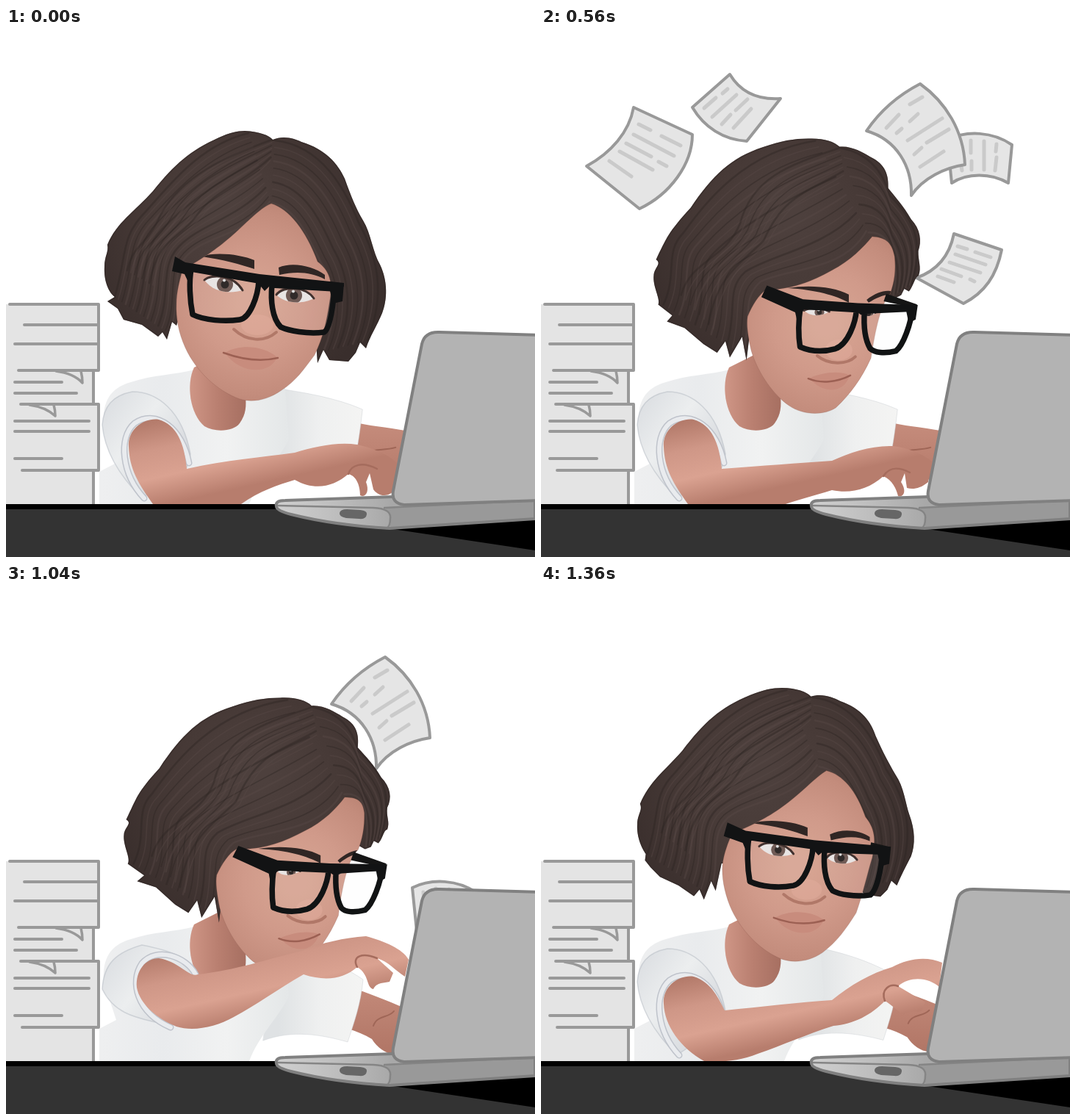
Write an HTML page with a canvas that moves like this. It is 720 px wide and 720 px high and loops after 1.44 s.

```html
<!DOCTYPE html>
<html lang="en">
<head>
<meta charset="utf-8">
<title>Busy at the laptop</title>
<style>
html, body { margin: 0; width: 100%; height: 100%; overflow: hidden; background: #fff; }
canvas { display: block; width: 100vw; height: 100vh; }
</style>
</head>
<body>
<canvas id="stage" width="720" height="720"></canvas>
<script>
const ctx = document.getElementById('stage').getContext('2d');
const STEP = 80, STEPS = 18;

// Poses per 80 ms step: head turn, near arm lift (0 to 3), far arm drop.
const TURN = [0, -.02, -.04, -.05, .04, .3, .65, .88, .95, .98, 1, 1, .99, .98, .95, .86, .68, .27];
const LIFT = [1, 1, 1, 1, 1, .8, .4, 0, .4, .8, .3, 0, 1.5, 3, 2, .8, .15, 2];
const DROP = [.62, .55, .5, .5, .5, .5, .55, .62, .4, .6, .3, 0, .5, 1, .8, .3, 0, .95];

// Each sheet: outline, text dashes, first visible step, vertical offset per step.
const SHEETS = [
  { edge: 'M126,108 L206,145 C206,185 176,226 134,246 L62,188 C95,170 120,142 126,108Z',
    text: 'M133,131L149,139M164,147L190,160M126,145L181,174M116,157L150,175M160,182L171,188M107,168L152,193M93,181L123,202',
    start: 1, dy: [226, 118, 31, -22, -44, -38, 0, 67, 164, 292] },
  { edge: 'M257,63 C272,88 296,98 326,96 L280,154 C248,152 222,135 206,108Z',
    text: 'M238,95L222,109M254,83L247,89M266,91L233,121M281,97L265,112M258,118L246,131M286,110L262,136',
    start: 4, dy: [147, 47, 2, 0, 1, 7, 27, 54, 102, 177] },
  { edge: 'M562,280 L627,302 C620,337 604,360 575,375 L511,340 C540,330 556,310 562,280Z',
    text: 'M567,297L580,301M591,305L612,312M564,308L605,322M556,319L598,333M545,328L572,338M584,342L590,345M540,338L562,346',
    start: 2, dy: [170, 112, 60, 15, -2, 0, 30, 90, 180], grows: true },
  { edge: 'M553,158 C580,145 615,147 641,165 L636,217 C612,203 580,203 559,217Z',
    text: 'M568,164L569,177M571,187L573,200M585,159V176M586,187V199M603,160V199M620,164L619,174M620,182L618,200',
    start: 4, dy: [270, 150, 55, -6, -36, -43, -30, 0, 90, 254, 420] },
  { edge: 'M516,76 C551,101 575,140 577,186 C550,190 520,204 504,228 C505,188 484,152 443,140 C460,115 485,92 516,76Z',
    text: 'M502,104L519,94M470,136L487,118M502,127L513,117M484,143L491,137M499,153L546,123M525,156L555,138M508,172L518,163M516,189L548,168',
    start: 4, dy: [250, 125, 50, 0, -22, -33, -36, -31, -12, 22, 75, 200] }
];

// Head shapes: [facing forward, turned to the laptop].
const HAIR = [
  'M325,140 C345,141 358,146 363,152 C377,146 392,150 402,155 C435,165 452,185 461,205 C470,230 476,245 486,262 C497,280 499,305 509,322 C520,345 519,370 512,388 C505,405 495,420 490,436 L482,428 L476,442 L466,454 L440,452 L432,438 L424,456 L420,400 L240,380 L232,405 L226,400 L219,424 L213,414 L207,420 L185,404 L160,397 L152,382 L138,372 L148,366 C140,360 133,345 134,325 C134,310 140,305 138,295 C150,265 175,250 200,222 C230,185 250,167 290,149 C303,143 315,140 325,140Z',
  'M375,154 C395,153 410,157 418,165 C435,164 450,174 460,180 C480,190 482,205 480,222 C492,235 502,245 512,262 C525,275 527,290 520,303 C518,315 524,322 520,332 C515,332 514,345 508,350 L502,347 L498,355 L490,358 L480,352 L470,350 L460,345 L450,340 L300,390 L292,461 L286,425 L268,454 L262,430 L250,447 L232,436 L206,412 L180,404 L190,396 L167,380 C172,372 160,355 162,340 C163,330 174,325 165,320 C180,290 178,285 210,250 C240,205 265,180 310,166 C335,157 355,154 375,154Z'];
const FACE = [
  'M361,239 C385,246 408,275 424,318 C440,330 446,345 440,375 C436,400 432,420 420,445 C405,465 395,480 375,493 C355,507 335,510 318,505 C290,495 260,470 244,435 C235,415 231,395 232,375 C232,360 236,345 240,330 C270,312 285,302 305,285 C325,268 345,245 361,239Z',
  'M463,290 C478,290 487,292 489,310 C489,330 486,345 480,360 C466,372 458,410 453,450 C440,480 425,500 405,520 C390,530 360,530 340,515 C320,500 300,470 292,440 C288,420 286,405 288,395 C295,380 305,365 315,360 C350,362 380,351 408,336 C435,323 452,305 463,290Z'];
const EYES = [
  ['M270,343 C280,334 310,336 322,357 C305,362 282,360 270,343Z', 'M370,390 C378,386 392,386 402,390 C392,397 378,398 370,390Z'],
  ['M368,363 C378,350 408,352 419,368 C405,376 380,376 368,363Z', 'M446,392 C450,388 456,388 460,390 C456,396 450,396 446,392Z']];
const IRISES = [['M298,349', 'M390,392'], ['M392,364', 'M453,392']];
const BROWS = [
  ['M266,311 C285,304 320,308 338,316 L338,328 C320,322 295,315 266,311Z', 'M345,360 C375,355 410,358 430,369 L430,380 C412,370 385,362 345,360Z'],
  ['M371,326 C390,318 418,324 434,336 L434,342 C415,332 395,331 372,336Z', 'M453,376 C465,365 478,360 484,362 L484,366 C475,366 465,372 456,379Z']];
const LENSES = [
  ['M252,328 L344,344 C343,365 332,395 318,397 C298,400 270,398 254,390 C250,370 249,345 252,328Z', 'M367,386 L441,389 C440,405 430,435 412,442 C395,447 380,446 366,440 C363,420 365,400 367,386Z'],
  ['M362,350 L447,355 C445,380 441,409 433,414 C410,417 385,412 374,407 C362,395 360,370 362,350Z', 'M451,390 L513,386 C512,405 500,435 490,443 C475,447 463,446 458,440 C450,425 450,405 451,390Z']];
const BAR = [
  'M230,311 L244,319 L345,335 L460,347 L458,372 L445,375 L440,354 L360,350 L352,358 L343,347 L255,331 L250,350 L243,335 L226,331Z',
  'M318,356 L372,376 L443,380 L520,381 L517,400 L508,405 L505,390 L456,391 L447,395 L440,390 L372,390 L362,405 L360,394 L310,371Z'];
const FAR_TEMPLE = ['M440,345 L460,348 L460,352 L440,350Z', 'M474,364 L519,380 L515,385 L470,375Z'];
const NOSE = ['M310,410 C328,427 352,428 368,414', 'M385,451 C400,463 425,463 436,452'];
const NOSE_TIP = ['M342,404', 'M414,443'];
const MOUTH = ['M296,442 C318,450 345,455 370,449', 'M373,482 C390,489 410,486 428,476'];
const LIPS = ['M298,442 C318,430 350,432 369,448 C360,472 318,472 298,442Z', 'M375,481 C390,475 412,470 427,476 C420,502 390,502 375,481Z'];

// Strand bundles: [outer, inner] edges, each in both head poses.
const BUNDLES = [
  { n: 15, outer: ['M330,143 C262,160 222,215 190,250 C155,285 165,310 148,366', 'M385,157 C285,172 232,240 200,285 C175,310 195,340 175,380'],
    inner: ['M359,236 C325,285 275,280 246,310 C222,335 240,375 222,415', 'M460,284 C430,340 350,335 312,352 C285,375 300,400 288,450'] },
  { n: 9, outer: ['M366,153 C430,160 462,220 480,265 C505,310 518,360 492,425', 'M420,167 C455,174 472,195 480,225 C510,252 530,280 512,340'],
    inner: ['M362,238 C395,245 412,285 428,318 C448,350 450,400 432,440', 'M463,286 C480,284 488,292 492,310 C494,325 494,340 492,355'] },
  { n: 7, outer: ['M362,152 C300,175 240,200 210,255 C190,300 175,290 165,330', 'M418,167 C350,190 300,205 285,270 C265,320 215,320 200,370'],
    inner: ['M360,180 C330,215 290,225 268,255 C240,290 215,280 200,350', 'M425,205 C375,235 350,235 320,300 C285,330 255,350 245,420'] }
];

// Near arm: flat on the keys, typing, reaching, raised.
const ARM = [
  'M167,570 C165,545 190,530 208,533 C232,540 243,565 246,600 C300,596 350,592 396,589 C420,578 450,568 478,569 C500,571 520,580 532,590 L527,618 C515,628 505,628 498,626 L495,606 L490,618 C498,630 494,639 486,637 C484,628 478,615 466,610 C445,629 420,634 396,629 C370,637 345,643 322,652 C260,655 225,652 200,648 C180,620 168,600 167,570Z',
  'M167,570 C165,545 190,530 208,533 C232,540 243,565 246,600 C300,588 350,584 393,578 C420,570 450,563 478,567 C500,572 520,580 532,592 L526,632 C515,640 505,635 500,628 L495,606 L490,618 C495,630 490,640 482,636 C482,625 478,610 466,607 C445,625 420,630 393,615 C370,622 345,630 320,648 C250,652 225,652 200,648 C180,620 168,600 167,570Z',
  'M167,570 C165,545 190,530 208,533 C232,540 243,565 250,579 C300,574 350,568 396,565 C420,545 450,528 478,520 C500,508 525,505 546,514 L542,547 C530,536 505,530 486,546 L523,568 L518,580 C508,582 500,578 494,585 C485,580 478,572 468,566 C450,585 425,598 398,600 C360,612 330,626 295,638 C270,648 245,650 222,648 C190,630 168,600 167,570Z',
  'M178,548 C176,525 190,508 208,508 C235,512 250,535 261,530 C310,525 360,508 403,498 C430,487 460,480 490,478 C515,485 540,495 548,510 L543,533 C530,525 520,512 505,508 L527,528 L522,540 C515,542 505,540 500,550 C490,548 495,530 478,520 C460,536 435,540 405,530 C370,550 340,572 310,588 C285,602 255,608 232,601 C205,590 182,570 178,548Z'];
const FINGER = [
  'M466,610 C475,596 488,598 502,605', 'M466,607 C470,594 485,590 505,600',
  'M468,566 C462,550 475,542 486,546', 'M478,520 C470,505 485,500 505,508'];
const SLEEVE = [
  'M131,540 C133,515 145,500 172,495 C205,495 240,520 251,580 L246,598 L185,640 C165,620 135,585 131,540Z',
  'M131,550 C133,515 150,500 185,490 C220,497 250,505 262,532 L250,545 L222,600 C190,590 150,590 131,550Z'];
const CUFF = ['M188,640 C158,608 152,558 175,538 C205,518 240,545 249,592', 'M224,602 C178,582 168,540 185,515 C205,492 245,505 258,530'];

// Far arm: lifted off the keys, dropped.
const FAR_SLEEVE = [
  'M368,488 C400,490 450,489 484,490 C480,515 485,545 482,570 C445,578 400,580 365,598Z',
  'M368,492 C400,498 450,512 486,537 C483,570 474,595 465,622 C430,612 390,605 350,620Z'];
const FAR_HAND = [
  'M478,518 C495,520 520,510 550,502 L540,572 C534,582 518,576 510,570 C495,566 488,568 478,570Z',
  'M470,548 C490,554 515,564 545,577 L530,638 C520,640 505,630 498,618 C488,612 478,608 466,604Z'];
const FAR_FINGER = ['M495,535 C505,555 520,548 534,556', 'M500,600 C505,585 520,590 528,580'];

const NUMBER = /-?[\d.]+/g;

function mix(a, b, p) {
  const end = b.match(NUMBER);
  let i = 0;
  return a.replace(NUMBER, v => (+v + (end[i++] - v) * p).toFixed(2));
}

function blend(poses, p) {
  const i = Math.max(0, Math.min(Math.floor(p), poses.length - 2));
  return mix(poses[i], poses[i + 1], p - i);
}

function fill(path, color) {
  ctx.fillStyle = color;
  ctx.fill(new Path2D(path));
}

function line(path, color, width) {
  ctx.strokeStyle = color;
  ctx.lineWidth = width;
  ctx.stroke(new Path2D(path));
}

function shade(gradient, ...colors) {
  colors.forEach((c, i) => gradient.addColorStop(i / (colors.length - 1), c));
  return gradient;
}

function ellipse(x, y, rx, ry, color) {
  ctx.fillStyle = color;
  ctx.beginPath();
  ctx.ellipse(x, y, rx, ry, 0, 0, Math.PI * 2);
  ctx.fill();
}

function drawSheets(step) {
  for (const s of SHEETS) {
    const dy = s.dy[step - s.start];
    if (dy === undefined) continue;
    ctx.save();
    ctx.translate(0, dy);
    if (s.grows) {
      const size = Math.min(1, .49 + .1275 * (step - 3));
      ctx.translate(568, 280);
      ctx.scale(size, size);
      ctx.translate(-568, -280);
    }
    fill(s.edge, '#e5e5e5');
    line(s.text, '#cacaca', 5);
    line(s.edge, '#999', 4);
    ctx.restore();
  }
}

function drawBody(drop) {
  fill(blend(FAR_HAND, drop), shade(ctx.createLinearGradient(0, 510, 0, 630), '#cb9282', '#b27767'));
  line(blend(FAR_FINGER, drop), '#9f6657', 2);
  const far = blend(FAR_SLEEVE, drop);
  fill(far, shade(ctx.createLinearGradient(370, 0, 485, 0), '#dfe2e4', '#eff0f0', '#f4f4f3'));
  line(far, 'rgba(200,204,208,.45)', 1);
  fill('M127,648 V604 L150,592 L133,540 C131,508 142,490 170,482 C200,472 230,472 257,465 L380,490 L385,560 C370,590 345,612 331,648Z',
    shade(ctx.createLinearGradient(130, 0, 385, 0), '#eeeff0', '#e9ebed', '#f1f2f2', '#e4e7e8'));
  fill('M256,462 C245,485 250,525 270,542 C285,551 310,549 318,538 C327,525 327,515 326,500 L300,440Z',
    shade(ctx.createLinearGradient(250, 0, 327, 0), '#cf9686', '#b97f70', '#a66f61'));
}

function drawHair(p) {
  const outline = blend(HAIR, p);
  const swing = Math.sin(Math.PI * Math.max(0, p));
  ctx.save();
  ctx.translate(-14 * swing, -5 * swing);
  fill(outline, shade(ctx.createRadialGradient(290 + 55 * p, 250, 20, 320 + 30 * p, 290, 210), '#4d403d', '#463936', '#392e2c'));
  ctx.clip(new Path2D(outline));
  for (const { n, outer, inner } of BUNDLES) {
    const from = blend(outer, p), to = blend(inner, p);
    for (let i = 0; i <= n; i++) {
      const strand = mix(from, to, i / n);
      line(strand, i % 2 ? 'rgba(88,74,70,.4)' : 'rgba(44,35,33,.4)', i % 3 ? 1.6 : 2.6);
    }
  }
  line(outline, '#30272580', 3);
  ctx.restore();
}

function drawFace(p) {
  const face = blend(FACE, p);
  const cx = 335 + 60 * p, cy = 375 + 30 * p;
  fill(face, shade(ctx.createRadialGradient(cx, cy, 15, cx, cy, 180), '#d7a492', '#d09a8a', '#c38c7c', '#ad7667'));
  line(face, 'rgba(130,80,68,.25)', 1);

  ctx.save();
  ctx.clip(new Path2D(face));
  EYES.forEach((eye, i) => {
    const shape = blend(eye, p);
    const [x, y] = blend(IRISES[i], p).match(NUMBER).map(Number);
    const r = 11 - 5 * p;
    fill(shape, '#e7e3e2');
    ctx.save();
    ctx.clip(new Path2D(shape));
    ellipse(x, y, r, r, '#66504a');
    ellipse(x, y, r * .5, r * .5, '#211b1a');
    ellipse(x - 1, y - r * .5, 2, 2, '#ddd');
    ctx.restore();
    line(shape.replace(/ C[^C]*Z/, ''), '#34221f', 3);
  });
  BROWS.forEach(brow => fill(blend(brow, p), '#302624'));

  const [nx, ny] = blend(NOSE_TIP, p).match(NUMBER).map(Number);
  ellipse(nx, ny, 22 - 4 * p, 14, 'rgba(226,174,157,.45)');
  line(blend(NOSE, p), 'rgba(150,90,76,.55)', 4);
  fill(blend(LIPS, p), '#c88c7d');
  line(blend(MOUTH, p), '#9c6053', 2.5);
  ctx.restore();

  fill(blend(FAR_TEMPLE, p), '#151515');
  LENSES.forEach(lens => {
    const rim = blend(lens, p);
    fill(rim, 'rgba(235,235,240,.07)');
    line(rim, '#111314', 7.5);
  });
  fill(blend(BAR, p), '#121314');
}

function drawNearArm(lift) {
  const raise = Math.max(0, lift - 2);
  const sleeve = blend(SLEEVE, raise);
  fill(sleeve, shade(ctx.createLinearGradient(130, 500, 240, 580), '#d9dce0', '#eceeef', '#d8dbdf'));
  line(sleeve, 'rgba(180,185,194,.5)', 1.5);
  const cuff = blend(CUFF, raise);
  line(cuff, '#bfc3cb', 9);
  line(cuff, '#e9ebee', 6);
  const top = 535 - 30 * raise;
  fill(blend(ARM, lift), shade(ctx.createLinearGradient(200, top, 225, top + 112), '#b47b6b', '#cf9787', '#daa291', '#b77d6d'));
  line(blend(FINGER, lift), '#a56c5d', 2.5);
}

function drawStack() {
  fill('M0,376H126V466H119V512H126V602H119V648H0Z', '#e4e4e4');
  line('M5,376H126V466H17M25,404H126M12,430H126M119,466V512M12,482H76M12,497H96' +
    'M20,512H126V602H22M12,535H113M12,549H113M12,586H76M119,602V648', '#999', 4);
  line('M68,467Q92,470 104,483Q104,475 102,467M32,513Q54,516 67,528Q67,520 65,513', '#999', 3.5);
}

function drawDesk() {
  fill('M0,648H720V720H0Z', '#333');
  fill('M0,648H400V655H0Z', '#000');
  fill('M520,681L720,666V711Z', '#000');
}

function drawLaptop() {
  const base = 'M368,651 Q366,643 380,643 L527,638 L720,638 V668 L522,681 C470,678 420,670 388,662 Q368,657 368,651Z';
  fill(base, shade(ctx.createLinearGradient(370, 0, 525, 0), '#cfcfcf', '#bebebe', '#a8a8a8'));
  fill('M515,653 L720,642 V668 L522,681 Q527,665 515,653Z', '#999');
  line('M370,650 L500,653 Q525,654 523,668 Q523,678 518,681M515,653L720,643', '#858585', 2.5);
  line(base, '#808080', 4);
  fill('M464,655 L482,656 Q492,657 491,662 Q490,669 481,668 L463,667 Q453,665 454,660 Q455,655 464,655Z', '#666');
  const lid = 'M527,630 L566,430 Q570,413 590,414 L726,418 V643 L542,649 Q524,647 527,630Z';
  fill(lid, '#b3b3b3');
  line(lid, '#808080', 4);
}

function draw(step) {
  ctx.fillStyle = '#fff';
  ctx.fillRect(0, 0, 720, 720);
  ctx.lineCap = ctx.lineJoin = 'round';
  drawSheets(step);
  drawBody(DROP[step]);
  drawHair(TURN[step]);
  drawFace(TURN[step]);
  drawNearArm(LIFT[step]);
  drawStack();
  drawDesk();
  drawLaptop();
}

function tick() {
  draw(Math.floor(performance.now() / STEP) % STEPS);
  requestAnimationFrame(tick);
}
tick();
</script>
</body>
</html>
```
